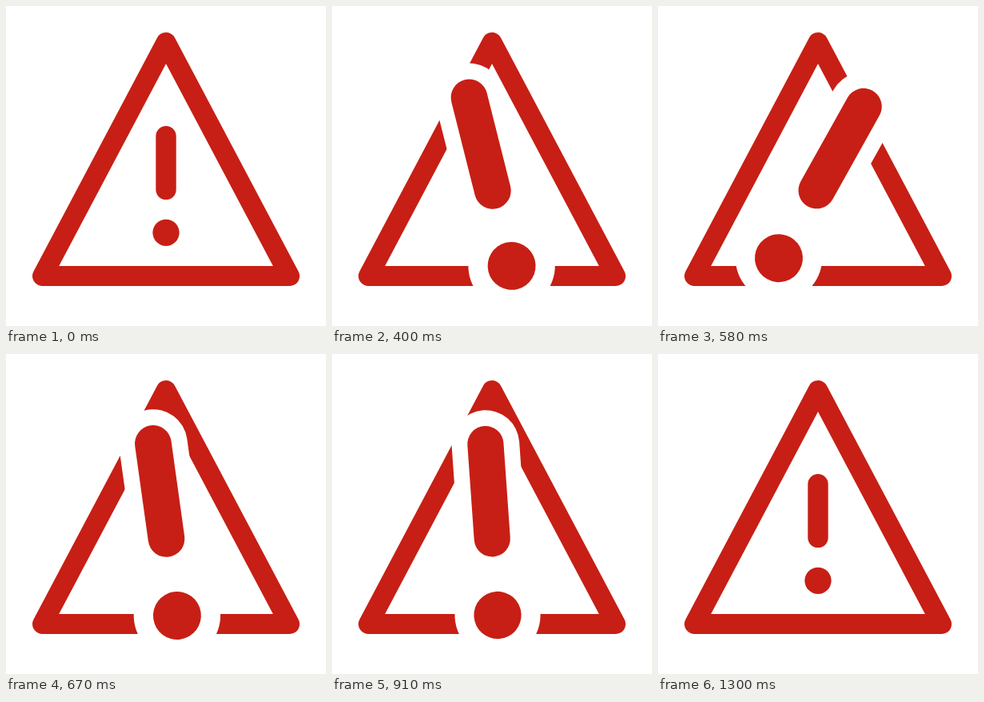
Recreate the animation shown at these times as an HTML page with a canvas. Size 400x400 px, loop 1360 ms.

```html
<!DOCTYPE html>
<html lang="en">
<head>
<meta charset="utf-8">
<title>Warning sign</title>
<style>
  html, body { margin: 0; width: 100%; height: 100%; overflow: hidden; background: #fff; }
  canvas { display: block; width: 400px; height: 400px; }
</style>
</head>
<body>
<canvas id="stage" width="400" height="400"></canvas>
<script>
const ctx = document.getElementById('stage').getContext('2d');
const RED = '#c71f15';
const LOOP = 1360, STEP = 30, START = 100, END = 1300;
const PIVOT = { x: 200, y: 227.5 };

// Keys are [time in ms, value], eased in and out between neighbours.
const SCALE = [[100, 1], [300, 1.8], [868, 1.8], [1295, 1]];
const ANGLE = [[238, 0], [405, -14.2], [572, 29.6], [738, -29.6], [962, 0]];

function valueAt(keys, t) {
  if (t <= keys[0][0]) return keys[0][1];
  for (let i = 1; i < keys.length; i++) {
    const [t0, v0] = keys[i - 1], [t1, v1] = keys[i];
    if (t < t1) {
      const p = (t - t0) / (t1 - t0);
      return v0 + (v1 - v0) * p * p * (3 - 2 * p);
    }
  }
  return keys[keys.length - 1][1];
}

function drawTriangle() {
  ctx.strokeStyle = RED;
  ctx.lineWidth = 25;
  ctx.lineJoin = 'round';
  ctx.beginPath();
  ctx.moveTo(200, 45.5);
  ctx.lineTo(354.5, 337.5);
  ctx.lineTo(45.5, 337.5);
  ctx.closePath();
  ctx.stroke();
}

// Coordinates are relative to the pivot.
function drawMark(color, stemRadius, dotRadius) {
  ctx.strokeStyle = ctx.fillStyle = color;
  ctx.lineWidth = stemRadius * 2;
  ctx.lineCap = 'round';
  ctx.beginPath();
  ctx.moveTo(0, -64.8);
  ctx.lineTo(0, 1.9);
  ctx.stroke();
  ctx.beginPath();
  ctx.arc(0, 55.8, dotRadius, 0, Math.PI * 2);
  ctx.fill();
}

function draw(t) {
  const scale = valueAt(SCALE, t);
  ctx.fillStyle = '#fff';
  ctx.fillRect(0, 0, 400, 400);
  drawTriangle();
  ctx.save();
  ctx.translate(PIVOT.x, PIVOT.y);
  ctx.rotate(valueAt(ANGLE, t) * Math.PI / 180);
  ctx.scale(scale, scale);
  drawMark('#fff', 23.8, 30.1);
  drawMark(RED, 12.7, 16.65);
  ctx.restore();
}

const origin = performance.now();

function tick() {
  const t = (performance.now() - origin) % LOOP;
  const held = START + Math.floor((t - START) / STEP) * STEP;
  draw(Math.min(held, END));
  requestAnimationFrame(tick);
}
tick();
</script>
</body>
</html>
```
